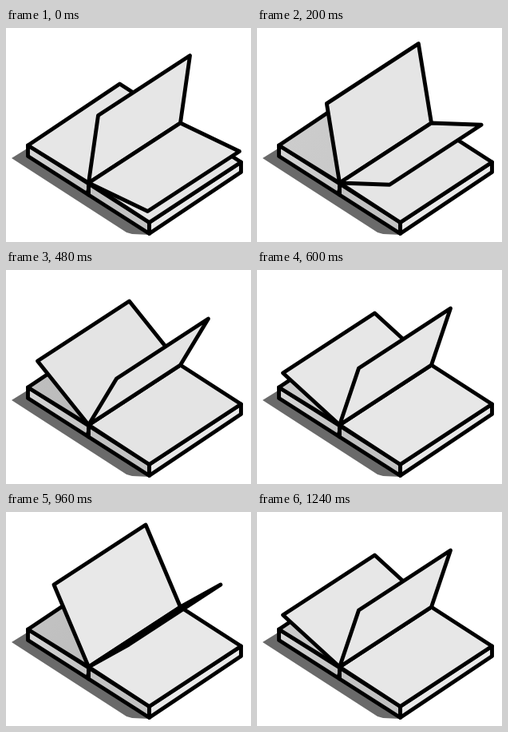
Recreate the animation shown at these times as an HTML page. Size 307x268 px, loop 1280 ms.

```html
<!DOCTYPE html>
<html lang="en">
<head>
<meta charset="utf-8">
<title>Turning pages</title>
<style>
  html, body { margin: 0; width: 100%; height: 100%; overflow: hidden; background: #fff; }
  svg { display: block; width: 100vw; height: 100vh; }
  .ink { stroke: #000; stroke-width: 4.9; stroke-linejoin: round; stroke-linecap: round; }
</style>
</head>
<body>
<svg viewBox="0 0 307 268">
  <defs>
    <linearGradient id="front" gradientUnits="userSpaceOnUse" x1="28" y1="0" x2="180" y2="0">
      <stop offset="0" stop-color="#d6d6d6"/>
      <stop offset=".5" stop-color="#c2c2c2"/>
      <stop offset="1" stop-color="#c2c2c2"/>
    </linearGradient>
    <linearGradient id="cast" gradientUnits="userSpaceOnUse" x1="38" y1="138" x2="104" y2="184">
      <stop id="castFar" offset="0"/>
      <stop id="castNear" offset="1"/>
    </linearGradient>
  </defs>
  <path d="M7 163 28 150 180 246V259L158 258 151 256Z" fill="#6a6a6a"/>
  <g class="ink">
    <path d="M27.5 147 103.5 195V209L27.5 160.5Z" fill="url(#front)"/>
    <path d="M103.5 195 179.5 243.5V257.5L103.5 209Z" fill="url(#front)"/>
    <path d="M179.5 243.5 294.5 168V180.5L179.5 257.5Z" fill="#e9e9e9"/>
    <path d="M27.5 147 142.5 70 218.5 119 103.5 194Z" fill="url(#cast)"/>
    <path d="M103.5 199 101.5 205" stroke-width="3"/>
    <path id="rightTop" d="M103.5 194 218.5 119 294.5 168 179.5 243.5Z"/>
    <path id="falling"/>
    <path id="rising"/>
  </g>
</svg>
<script>
const TURN = 640, STEP = 40;
const el = id => document.getElementById(id);
const times = [0, 120, 320, 480, 600];

// Near free corner of each page, measured from the spine's near end
const rising = { x: [74, 69, 50.5, 35, 24], y: [35.5, 20, -28, -58, -71] };
const falling = { x: [12, 0, -43.5, -64, -71], y: [-84.5, -95, -103, -80, -65] };
const paper = [230, 227, 232, 228, 231];
const castFar = [230, 214, 194, 190, 202];
const castNear = [230, 212, 189, 186, 200];

// Smooth curve through the keys, at rest on both ends
function ease(values, t) {
  const last = times.length - 1;
  if (t >= times[last]) return values[last];
  const slope = i => (values[i + 1] - values[i]) / (times[i + 1] - times[i]);
  const tangent = i => {
    if (i === 0 || i === last) return 0;
    const a = slope(i - 1), b = slope(i);
    return a * b > 0 ? 2 * a * b / (a + b) : 0;
  };
  let i = 0;
  while (t >= times[i + 1]) i++;
  const h = times[i + 1] - times[i], s = (t - times[i]) / h;
  const blend = s * s * (3 - 2 * s);
  return values[i] + (values[i + 1] - values[i]) * blend
    + h * s * (1 - s) * ((1 - s) * tangent(i) - s * tangent(i + 1));
}

function gray(values, t) {
  const v = Math.round(ease(values, t));
  return `rgb(${v},${v},${v})`;
}

function drawPage(id, corner, t) {
  const x = ease(corner.x, t), y = ease(corner.y, t);
  el(id).setAttribute('d',
    `M103.5 194L${103.5 + x} ${194 + y}L${218.5 + x} ${119 + y}L218.5 119Z`);
}

function render(now) {
  const t = Math.floor((now % TURN) / STEP) * STEP;
  drawPage('falling', falling, t);
  drawPage('rising', rising, t);
  for (const id of ['rightTop', 'falling', 'rising']) {
    el(id).setAttribute('fill', gray(paper, t));
  }
  el('castFar').setAttribute('stop-color', gray(castFar, t));
  el('castNear').setAttribute('stop-color', gray(castNear, t));
}

const start = performance.now();
function tick() {
  render(performance.now() - start);
  requestAnimationFrame(tick);
}
tick();
</script>
</body>
</html>
```
